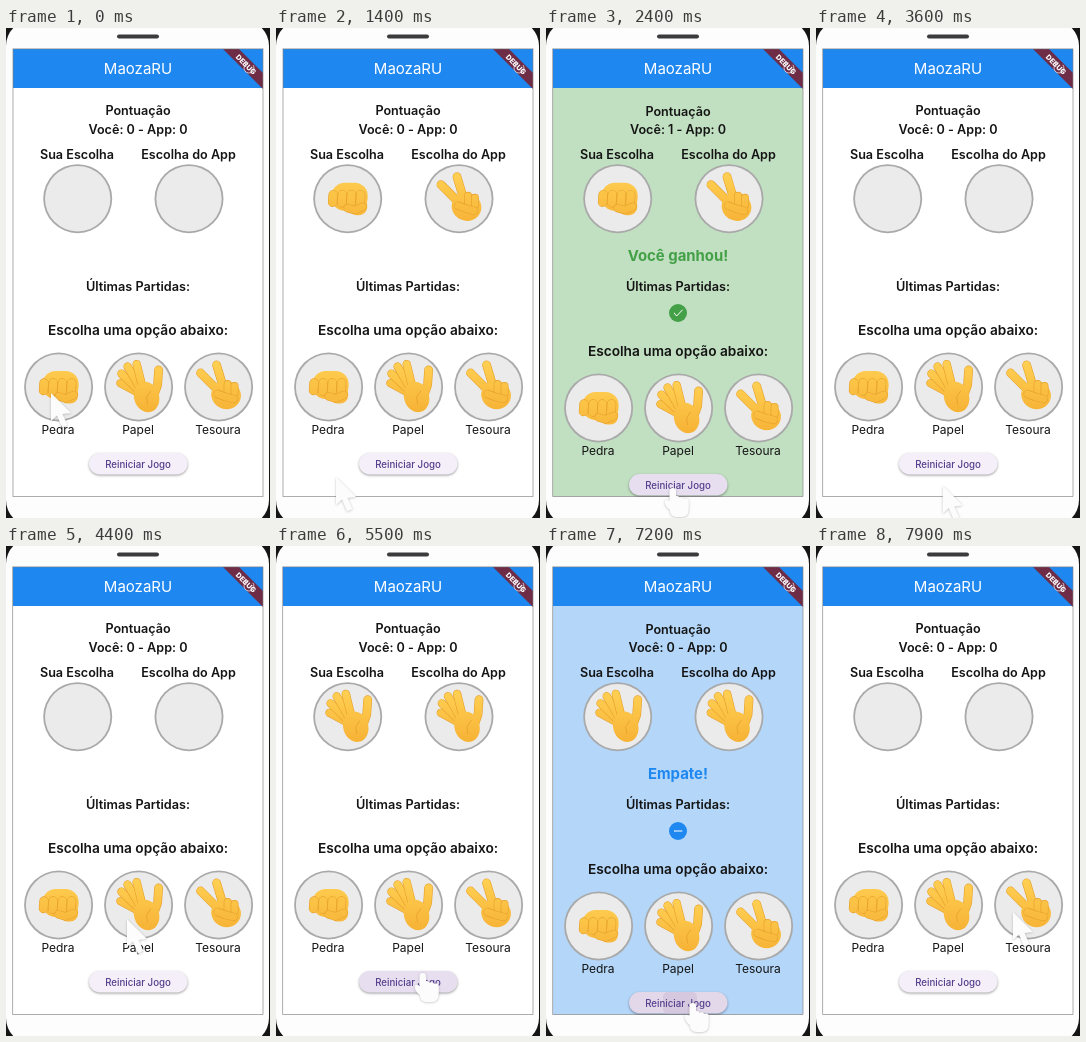
An HTML page with a canvas that plays this animation: 264 px wide and 490 px high, repeating every 8000 ms.

```html
<!DOCTYPE html>
<html lang="pt">
<head>
<meta charset="utf-8">
<title>MaozaRU</title>
<style>
html, body { margin: 0; width: 100%; height: 100%; overflow: hidden; background: #111; }
canvas { display: block; width: 264px; height: 490px; }
</style>
</head>
<body>
<canvas id="stage"></canvas>
<script>
const W = 264, H = 490, LOOP = 8000;
const canvas = document.getElementById('stage');
const ctx = canvas.getContext('2d');
const dpr = window.devicePixelRatio || 1;
canvas.width = W * dpr;
canvas.height = H * dpr;

const BLUE = '#1e87f0', GREEN = '#43a047', EDGE = '#e6a02c';
const SKIN = ctx.createLinearGradient(0, -24, 0, 26);
SKIN.addColorStop(0, '#ffcf52');
SKIN.addColorStop(1, '#f6b235');

const start = { x: 45, y: 365 };
const moves = [
  { from: 100, to: 500, x: 60, y: 449 },
  { from: 1600, to: 2400, x: 127, y: 461 },
  { from: 3400, to: 4400, x: 121, y: 373 },
  { from: 4700, to: 5100, x: 147, y: 428 },
  { from: 6400, to: 7000, x: 147, y: 458 },
  { from: 7300, to: 7900, x: 197, y: 366 }
];

const rounds = [
  { pick: 200, result: 1500, press: 2900, reset: 3000, you: fist, app: scissors,
    score: 1, bg: '#c1dfc1', color: GREEN, label: 'Você ganhou!', mark: [[-4, 0], [-1.3, 3], [4.3, -3]] },
  { pick: 4700, result: 5900, press: 7200, reset: 7300, you: paper, app: paper,
    score: 0, bg: '#b3d6f9', color: BLUE, label: 'Empate!', mark: [[-4, 0], [4, 0]] }
];

function pointerAt(t) {
  let { x, y } = start;
  for (const m of moves) {
    const k = Math.min(1, Math.max(0, (t - m.from) / (m.to - m.from)));
    x += (m.x - x) * k * k;
    y += (m.y - y) * k * k;
  }
  return { x, y };
}

function trace(points) {
  ctx.beginPath();
  points.forEach(([x, y]) => ctx.lineTo(x, y));
}

function disc(x, y, r, fill) {
  ctx.beginPath();
  ctx.arc(x, y, r, 0, Math.PI * 2);
  ctx.fillStyle = fill;
  ctx.fill();
}

function pill(x, y, w, h, r, fill) {
  ctx.beginPath();
  ctx.roundRect(x, y, w, h, r);
  ctx.fillStyle = fill;
  ctx.fill();
}

function text(s, x, y, size, weight = 600, color = '#141414') {
  ctx.font = `${weight} ${size}px Inter, Roboto, sans-serif`;
  ctx.textAlign = 'center';
  ctx.textBaseline = 'alphabetic';
  ctx.fillStyle = color;
  ctx.fillText(s, x, y);
}

function stroke(points, width, color) {
  ctx.lineCap = ctx.lineJoin = 'round';
  ctx.lineWidth = width;
  ctx.strokeStyle = color;
  trace(points);
  ctx.stroke();
}

function limb(points, width) {
  stroke(points, width + 0.8, EDGE);
  stroke(points, width - 0.4, SKIN);
}

function palm(x, y, rx, ry, turn) {
  ctx.beginPath();
  ctx.ellipse(x, y, rx, ry, turn, 0, Math.PI * 2);
  ctx.fillStyle = SKIN;
  ctx.fill();
}

function fist() {
  pill(-16, -16, 36, 28, 13, SKIN);
  pill(1, -2, 18.5, 18.5, 8, SKIN);
  for (let i = 3; i >= 0; i--) {
    const x = 13 - i * 9.2;
    limb([[x, -4], [x - 0.5, 5 - i * 0.5]], 8.6);
  }
  limb([[15, 8], [7, 11.5], [0, 9.5]], 7.5);
}

function paper() {
  limb([[20, -17], [19, -2], [14, 12]], 8);
  for (let i = 0; i < 4; i++) {
    const angle = (208 + 16 * i) * Math.PI / 180;
    const reach = 34 - 1.5 * (i - 2.1) ** 2;
    const along = r => [6 + r * Math.cos(angle), 9 + r * Math.sin(angle)];
    limb([along(reach), along(9)], 7.6);
  }
  palm(8, 10, 12.5, 15.5, -0.3);
  stroke([[12, 4], [8, 10], [9, 17]], 0.8, EDGE);
}

function scissors() {
  limb([[-2, -22], [4, -2]], 8);
  limb([[-18, -14], [0, 4]], 8);
  palm(7.5, 8, 15, 14, 0.4);
  for (let i = 0; i < 2; i++) limb([[9 + 7 * i, -3 + 2 * i], [9 + 7 * i, 5 + i]], 7);
  limb([[15, 12], [7, 10], [-1, 7]], 7.5);
}

function slot(x, y, hand) {
  disc(x, y, 34.5, '#a9a9a9');
  disc(x, y, 32.7, '#ebebeb');
  if (!hand) return;
  ctx.save();
  ctx.translate(x, y);
  hand();
  ctx.restore();
}

function shadow(color, blur, dy) {
  ctx.shadowColor = color;
  ctx.shadowBlur = blur * dpr;
  ctx.shadowOffsetY = dy * dpr;
}

function button(y, hover, pressed) {
  ctx.save();
  shadow('rgba(0,0,0,.38)', 2.5, 1);
  pill(83, y, 98.5, 21.5, 11, pressed ? '#e2d8ea' : hover ? '#e7dff0' : '#f4eff8');
  ctx.restore();
  if (pressed) pill(117, y, 34, 21.5, 5, '#d6c9df');
  text('Reiniciar Jogo', 132, y + 14.8, 9.7, 500, '#553d8c');
}

function arrow() {
  const shape = new Path2D();
  [[0, 0], [0, 28], [6, 22.5], [11, 34.5], [16.5, 32], [11.5, 21], [20, 20]]
    .forEach(([x, y]) => shape.lineTo(x, y));
  return shape;
}

function pointing() {
  const shape = new Path2D();
  shape.roundRect(-3.5, -1, 6.5, 20, 3);
  for (let i = 0; i < 3; i++) shape.roundRect(1 + i * 4.6, 7 + i * 1.3, 5.6, 12, 2.7);
  shape.roundRect(-3, 12, 18.5, 16, 6);
  shape.ellipse(-4, 16, 3, 6, -0.6, 0, Math.PI * 2);
  return shape;
}

function pointer(p, shape) {
  ctx.save();
  ctx.translate(p.x, p.y);
  shadow('rgba(0,0,0,.25)', 2.5, 0.5);
  ctx.fillStyle = '#fcfcfc';
  ctx.fill(shape);
  ctx.restore();
}

function phone(bg) {
  ctx.fillStyle = '#151515';
  ctx.fillRect(0, 0, W, H);
  pill(0, -8, 263, 506, 26, '#fdfdfd');
  pill(111, 6.5, 42, 4, 2, '#3b3b3d');
  ctx.fillStyle = bg;
  ctx.fillRect(7, 21, 250, 447.5);
}

function appBar() {
  ctx.fillStyle = BLUE;
  ctx.fillRect(7, 21, 250, 39);
  text('MaozaRU', 132, 46, 15, 400, '#fff');
  trace([[217, 21], [233, 21], [257, 45], [257, 61]]);
  ctx.fillStyle = 'rgba(118,36,56,.92)';
  ctx.fill();
  ctx.lineWidth = 1;
  ctx.strokeStyle = 'rgba(255,255,255,.7)';
  ctx.beginPath();
  ctx.arc(243, 40, 5, -0.6, 4.6);
  ctx.stroke();
  ctx.save();
  ctx.translate(240, 36.5);
  ctx.rotate(Math.PI / 4);
  text('DEBUG', 0, 2.6, 7.2, 800, '#fff');
  ctx.restore();
  ctx.strokeStyle = 'rgba(130,130,130,.65)';
  ctx.strokeRect(7, 20.8, 250, 447.7);
}

function draw(t) {
  const round = rounds.find(r => t >= r.pick && t < r.reset);
  const done = round && t >= round.result;
  const shift = done ? 21 : 0;
  const buttonY = 425 + shift;

  ctx.setTransform(dpr, 0, 0, dpr, 0, 0);
  phone(done ? round.bg : '#fff');
  appBar();

  text('Pontuação', 132, done ? 87.5 : 86.5, 12.6);
  text(`Você: ${done ? round.score : 0} - App: 0`, 132, 105.5, 12.6);
  text('Sua Escolha', 71, 130.5, 12.6);
  text('Escolha do App', 182.5, 130.5, 12.6);
  slot(71.7, 170.7, round && round.you);
  slot(183, 170.7, round && round.app);

  text('Últimas Partidas:', 132, 262.5, 12.7);
  if (done) {
    text(round.label, 132, 232.5, 14.9, 700, round.color);
    disc(132, 285, 9, round.color);
    stroke(round.mark.map(([x, y]) => [132 + x, 285 + y]), 1, '#fff');
  }

  text('Escolha uma opção abaixo:', 132, 307 + shift, 13.7);
  [['Pedra', fist], ['Papel', paper], ['Tesoura', scissors]].forEach(([name, hand], i) => {
    const x = 52 + i * 80;
    slot(x + 0.6, 359 + shift, hand);
    text(name, x, 406 + shift, 12, 400);
  });

  const p = pointerAt(t);
  const over = p.x > 83 && p.x < 181 && p.y > buttonY && p.y < buttonY + 22;
  button(buttonY, over, round && t >= round.press);
  ctx.fillStyle = '#fdfdfd';
  ctx.fillRect(80, 469, 104, 4);
  pointer(p, over ? pointing() : arrow());
}

// The picture advances ten times a second.
function tick() {
  const t = performance.now() % LOOP;
  draw(Math.floor(t / 100) * 100);
  requestAnimationFrame(tick);
}
tick();
</script>
</body>
</html>
```
